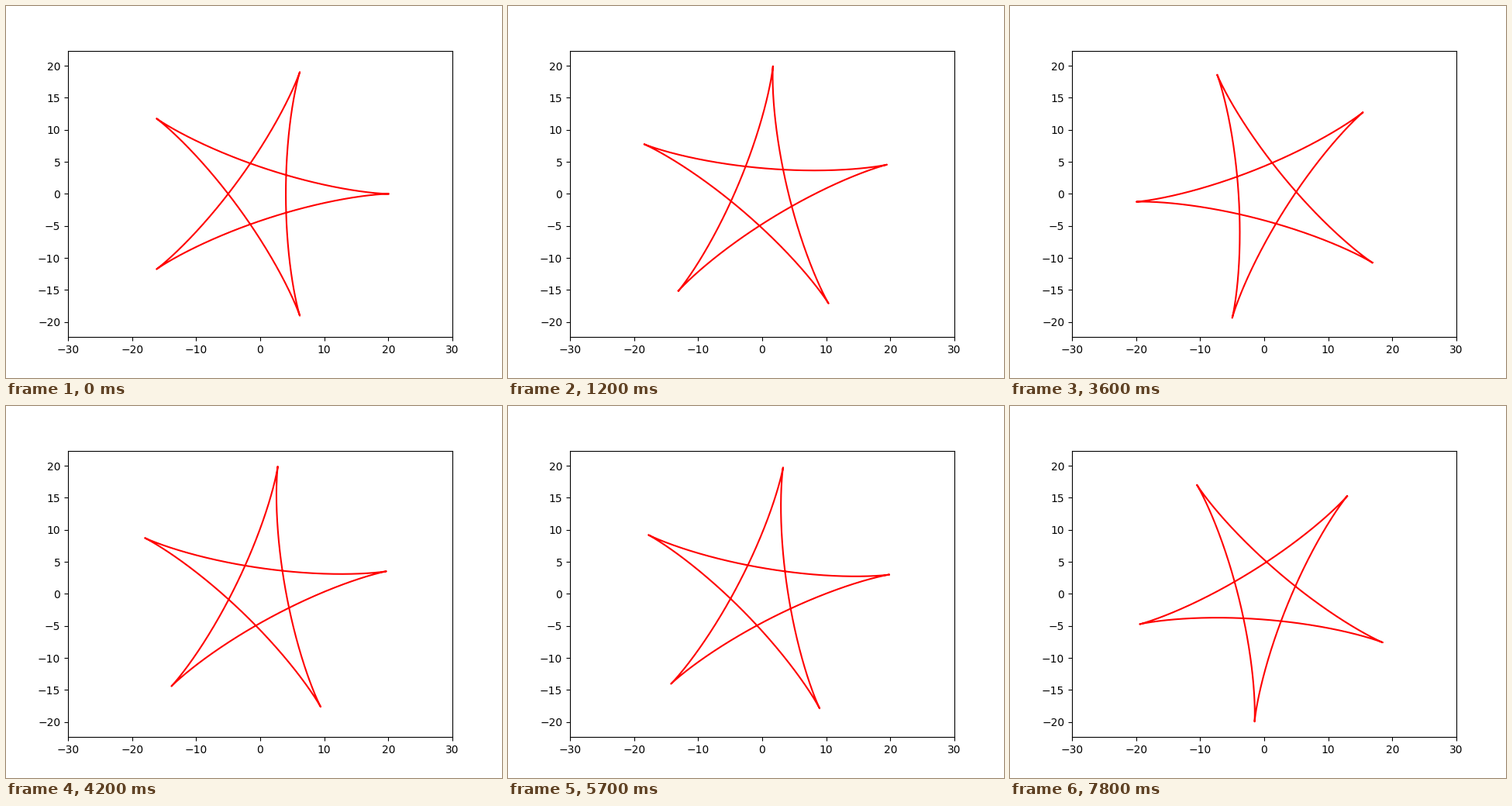
A matplotlib script that plays this animation: 640 by 480 pixels, repeating every 8000 ms.

```python
import numpy as np
import matplotlib.pyplot as plt
from matplotlib.animation import FuncAnimation

OUTER, ROLLER = 20, 8      # radii of the fixed and rolling circles
INTERVAL = 100             # ms per tick
TICKS = 80
TICKS_PER_STEP = 3         # the star turns one radian every 300 ms

arm = OUTER - ROLLER
t = np.linspace(0, 4 * np.pi, 1000)
star = arm * np.exp(1j * t) + ROLLER * np.exp(-1j * t * arm / ROLLER)

fig, ax = plt.subplots(figsize=(6.4, 4.8), dpi=100)
half_width = 30
half_height = half_width * (0.77 * 480) / (0.775 * 640)   # equal scale on both axes
ax.set_xlim(-half_width, half_width)
ax.set_ylim(-half_height, half_height)
line, = ax.plot([], [], color="red")


def update(tick):
    turned = star * np.exp(1j * (tick // TICKS_PER_STEP))
    line.set_data(turned.real, turned.imag)
    return line,


anim = FuncAnimation(fig, update, frames=TICKS, interval=INTERVAL,
                     repeat=True, repeat_delay=0)
plt.show()
```
